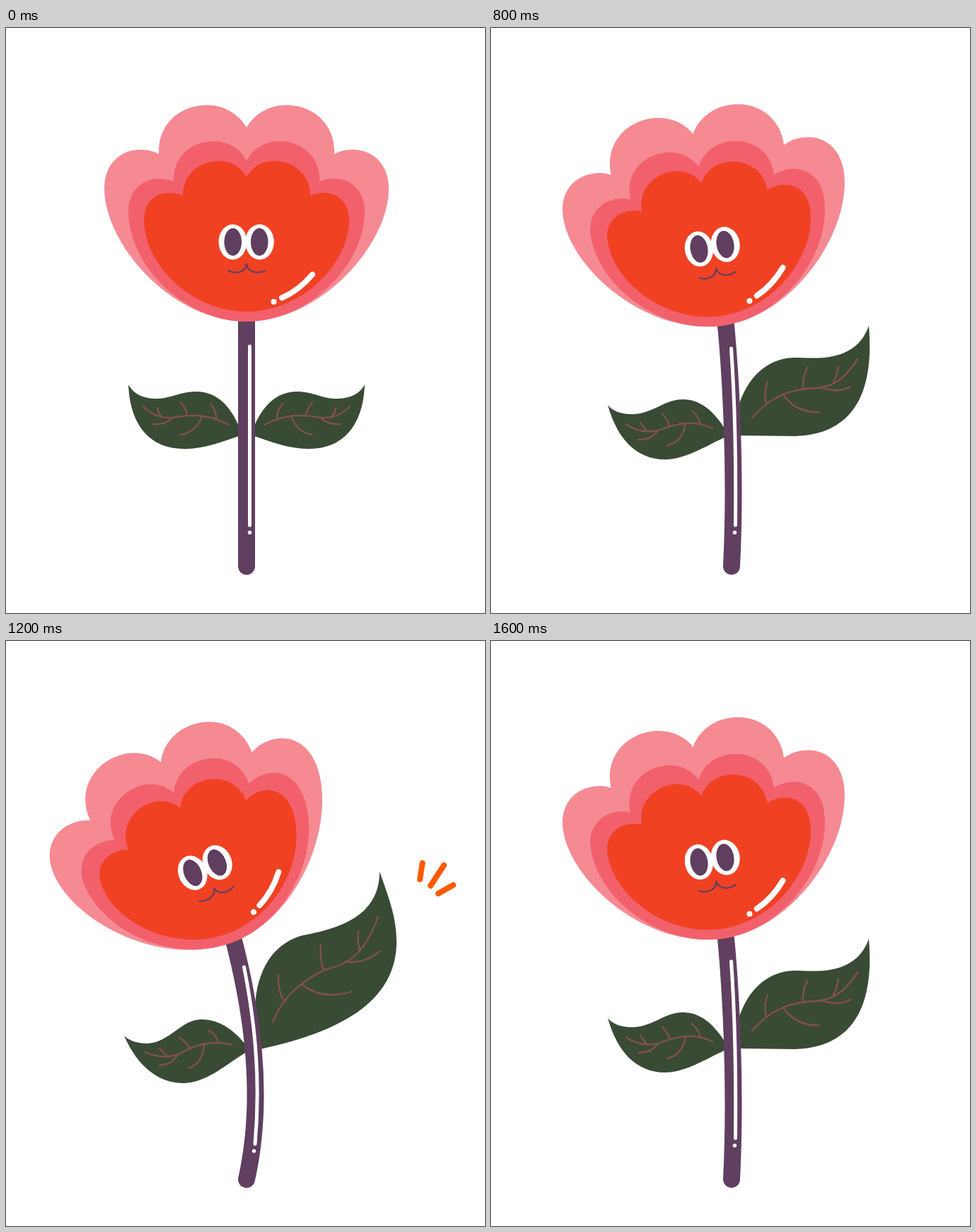
An HTML page that plays this animation: 677 px wide and 827 px high, repeating every 1700 ms.

```html
<!DOCTYPE html>
<html lang="en">
<head>
<meta charset="utf-8">
<title>Waving flower</title>
<style>
  html, body { margin: 0; width: 100%; height: 100%; overflow: hidden; background: #fff; }
  svg { display: block; width: 100vw; height: 100vh; }
  path { fill: none; stroke-linecap: round; }
  .leaf { fill: #394a35; }
  .vein { stroke: #855049; stroke-width: 2.3; }
  .stem { stroke: #603f60; stroke-width: 24; }
  .shine { stroke: #fff; stroke-width: 5; }
  .mouth { stroke: #603f60; stroke-width: 2.2; }
  .sparks { stroke: #ff5a00; stroke-width: 8; }
  .white { fill: #fff; }
  .pupil { fill: #603f60; }
</style>
</head>
<body>
<svg viewBox="0 0 677 827">
  <g id="body"></g>
  <g id="head">
    <g id="petals"></g>
    <ellipse class="white" cx="320.5" cy="302.5" rx="20" ry="25"/>
    <ellipse class="white" cx="358.5" cy="302.5" rx="20.3" ry="25"/>
    <ellipse class="pupil" cx="320.7" cy="302.5" rx="12.3" ry="19.5"/>
    <ellipse class="pupil" cx="358.2" cy="302.5" rx="12.3" ry="19.5"/>
    <path class="mouth" d="M314 343C324 348 339 346 340 333C341 346 356 348 366 343"/>
    <path class="shine" style="stroke-width:8" d="M390 381.5Q414 371 433 348.5"/>
    <circle class="white" cx="378.5" cy="387" r="4"/>
  </g>
  <path id="sparks" class="sparks" d="M588.5 314L585 337M619 317L600 346M632 345L611 357"/>
</svg>
<script>
const el = id => document.getElementById(id);
const CENTRE = 340;

// Each petal layer is its right half as a Bezier chain, mirrored at the centre line.
function petalPath(half) {
  const mirrored = half.slice(0, -1).reverse().map(([x, y]) => [2 * CENTRE - x, y]);
  const [start, ...rest] = [...half, ...mirrored];
  return `M${start}C${rest.join(' ')}Z`;
}
const layers = [
  ['#f58a93', [[340, 141], [350, 122], [372, 109], [396, 109], [436, 109], [466, 138], [464, 178],
    [472, 174], [480, 172], [490, 172], [520, 172], [541, 194], [541, 227], [541, 305], [446, 415], [340, 415]]],
  ['#f2606c', [[340, 188], [348, 171], [366, 160], [386, 160], [420, 160], [445, 184], [443, 217],
    [450, 214], [457, 213], [464, 213], [489, 213], [507, 232], [507, 259], [507, 335], [428, 415], [340, 415]]],
  ['#f04123', [[340, 211], [347, 197], [362, 188], [379, 188], [409, 188], [431, 210], [430, 237],
    [436, 234], [442, 233], [449, 233], [470, 233], [485, 248], [485, 271], [485, 332], [420, 401], [340, 401]]],
];
el('petals').innerHTML = layers
  .map(([colour, half]) => `<path style="fill:${colour}" d="${petalPath(half)}"/>`).join('');

const leaf = (outline, veins) => `<path class="leaf" d="${outline}Z"/><path class="vein" d="${veins}"/>`;
const stem = (line, shine, x, y) => `<path class="stem" d="${line}"/><path class="shine" d="${shine}"/>
  <circle class="white" cx="${x}" cy="${y}" r="2.7"/>`;

const restLeaf = leaf(
  'M330 565C318 535 298 514 269 514C245 514 232 525 210 524C192 523 180 517 173 504C175 560 202 595 252 595C280 595 305 585 329 577',
  'M194 535C208 548 220 552 234 551C262 546 285 545 315 561M214 537Q215 545 221 551M247 529Q255 539 256 548' +
  'M289 531Q297 541 297 551M208 560Q226 561 235 551M247 575Q270 571 277 548');

const poses = {
  rest: {
    head: '',
    body: restLeaf + `<g transform="translate(${2 * CENTRE}) scale(-1 1)">${restLeaf}</g>` +
      stem('M340 400V761', 'M344.5 450V703', 344.5, 713.3),
  },
  lean: {
    head: 'translate(-27 6.7) rotate(-9.8 339.5 302)',
    body: leaf(
      'M334 572C315 540 295 525 271 525C245 525 230 545 200 546C185 546 172 542 165 533C178 580 205 610 246 610C275 610 305 590 334 577',
      'M191 560Q210 574 236 569C265 558 285 554 313 566M211 558L221 571M242 545Q251 555 252 563' +
      'M284 541Q294 550 296 560M208 582Q227 582 235 570M249 590Q270 586 275 560') +
    leaf(
      'M350 534C362 495 390 466 430 466C455 466 515 475 534 421C539 480 534 574 430 577L348 576',
      'M369 551C395 520 425 510 460 509C490 507 505 488 518 468M391 500Q385 515 389 531M447 480Q440 495 441 510' +
      'M491 478Q489 492 484 500M413 518Q430 544 464 543M467 508Q490 517 508 507') +
    stem('M331 410C338 480 347 620 340 761', 'M339.5 453Q347 560 345.5 703', 344.5, 713.3),
  },
  wave: {
    head: 'translate(-58.5 18) rotate(-22.8 339.5 302)',
    body: leaf(
      'M342 575C325 552 303 535 277 535C247 535 232 567 200 569C185 569 174 565 167 558C185 600 215 625 250 625C285 625 315 595 342 580',
      'M197 581C215 590 228 588 243 585C268 570 290 564 320 571M217 576L227 586M245 560Q255 567 260 576' +
      'M287 550Q297 557 300 567M217 600Q236 598 242 585M258 604Q278 597 280 571') +
    leaf(
      'M352 515C356 455 385 425 420 416C465 407 528 392 528 326C540 360 552 390 552 425C552 525 440 560 350 579',
      'M377 539C392 500 420 480 450 465C485 456 505 445 526 390M385 472Q384 495 393 509M445 429Q443 450 449 465' +
      'M498 410Q496 425 500 436M418 485Q445 508 488 496M479 453Q505 458 529 438') +
    stem('M317 405C346 510 367 640 340 761', 'M336.5 461C352 540 360 620 352 711', 350.5, 721),
  },
};

// Poses snap from one to the next: [start in ms, pose].
const LOOP = 1700;
const timeline = [[0, 'rest'], [700, 'lean'], [900, 'wave'], [1600, 'lean']];
let shown;

function draw(now) {
  const t = now % LOOP;
  const name = timeline.findLast(([start]) => t >= start)[1];
  if (name !== shown) {
    el('body').innerHTML = poses[name].body;
    el('head').setAttribute('transform', poses[name].head);
    shown = name;
  }
  el('sparks').style.display = t >= 1100 && t < 1500 ? '' : 'none';
}

let begin;
function tick(now) {
  begin ??= now;
  draw(now - begin);
  requestAnimationFrame(tick);
}
draw(0);
requestAnimationFrame(tick);
</script>
</body>
</html>
```
